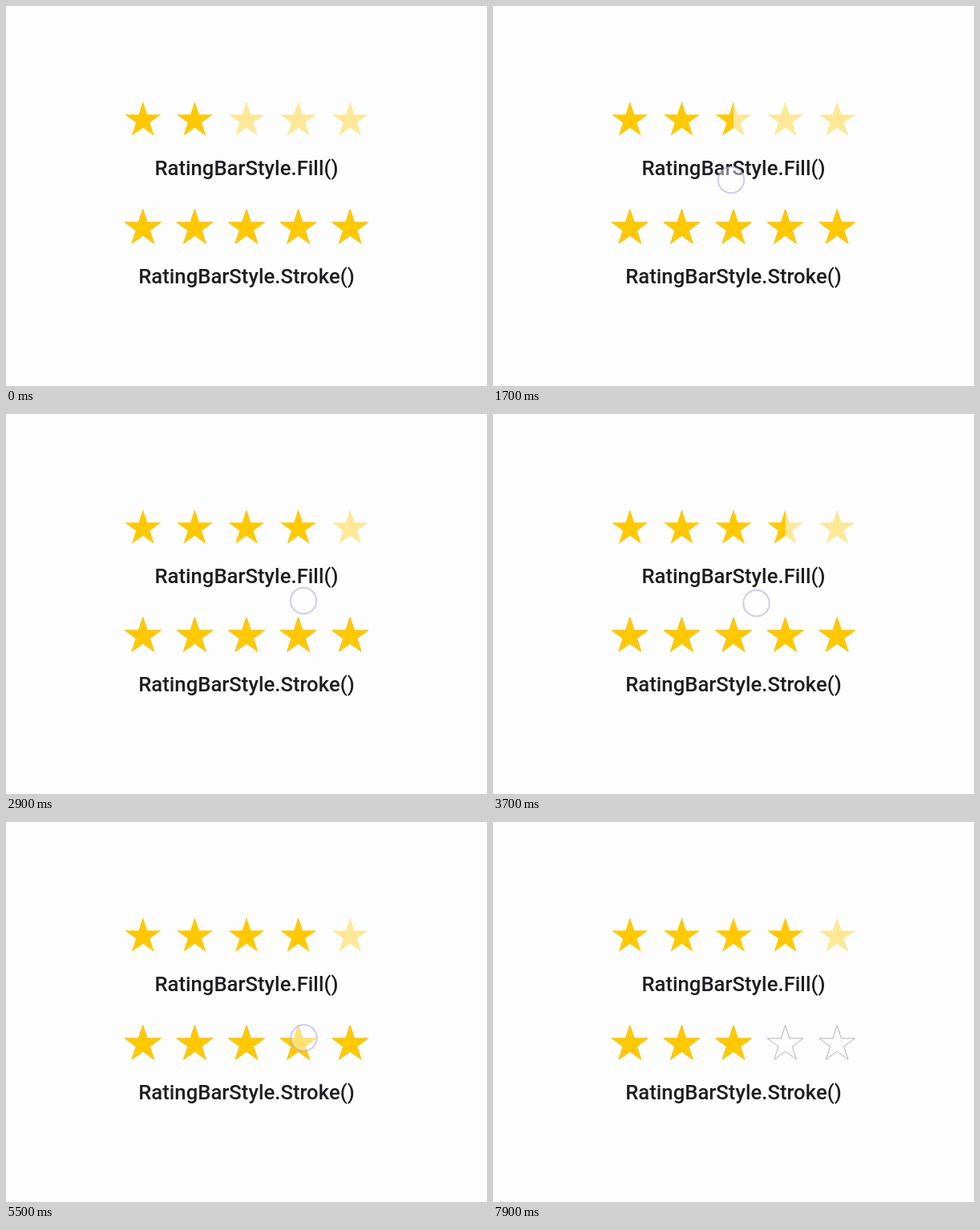
An HTML page that plays this animation: 600 by 474 pixels, repeating every 8 s.

```html
<!DOCTYPE html>
<html lang="en">
<head>
<meta charset="utf-8">
<title>Rating bar styles</title>
<style>
  html, body { margin: 0; width: 100%; height: 100%; overflow: hidden; background: #fdfdfd; }
  svg { display: block; width: 100vw; height: 100vh; }
  text { font: 500 25.7px Roboto, sans-serif; fill: #1e1e21; text-anchor: middle; }
</style>
</head>
<body>
<svg id="stage" viewBox="0 0 600 474">
  <text x="300" y="211">RatingBarStyle.Fill()</text>
  <text x="300" y="346">RatingBarStyle.Stroke()</text>
</svg>
<script>
const LOOP = 8000, STEP = 100;
const GOLD = '#ffc800';
const RADIUS = 23.5, SPACING = 64.6, BOX = 50;
const stage = document.getElementById('stage');

function add(parent, tag, attrs) {
  const node = document.createElementNS('http://www.w3.org/2000/svg', tag);
  for (const key in attrs) node.setAttribute(key, attrs[key]);
  return parent.appendChild(node);
}

// Regular five-pointed star around the origin, with straight arms.
const inner = RADIUS * (3 - Math.sqrt(5)) / 2;
const star = Array.from({ length: 10 }, (_, i) => {
  const r = i % 2 ? inner : RADIUS, angle = i * Math.PI / 5;
  return [r * Math.sin(angle), -r * Math.cos(angle)];
}).join(' ');

// Each star is an empty shape below a gold one, clipped to the rated part.
function ratingBar(id, cy, emptyStyle, goldStyle) {
  const clips = [];
  for (let i = 0; i < 5; i++) {
    const cx = 300 + SPACING * (i - 2);
    const group = add(stage, 'g', { transform: `translate(${cx} ${cy})` });
    const clip = add(group, 'clipPath', { id: id + i });
    clips.push(add(clip, 'rect', { x: -BOX / 2, y: -BOX / 2, width: BOX, height: BOX }));
    add(group, 'polygon', { points: star, ...emptyStyle });
    add(group, 'polygon', { points: star, fill: GOLD, ...goldStyle, 'clip-path': `url(#${id}${i})` });
  }
  return rating => clips.forEach((rect, i) =>
    rect.setAttribute('width', BOX * clamp(rating - i)));
}

const clamp = value => Math.min(1, Math.max(0, value));
const smooth = k => k * k * (3 - 2 * k);

const setFill = ratingBar('fill', 142.8, { fill: GOLD, 'fill-opacity': 0.4 });
const setStroke = ratingBar('stroke', 277.2,
  { fill: 'none', stroke: '#a0a0a0', 'stroke-width': 0.8 },
  { stroke: GOLD, 'stroke-width': 1 });

const pointer = add(stage, 'circle', {
  r: 16.2, fill: '#fff', 'fill-opacity': 0.45,
  stroke: '#aaa4d8', 'stroke-opacity': 0.55, 'stroke-width': 2
});

// Turning points of the drag: [time, x, y]
const drag = [
  [700, 252, 208], [1700, 297, 217], [2900, 371, 233], [3700, 328.5, 236],
  [4800, 319, 252], [5800, 386, 274], [6400, 386, 274], [6500, 358.5, 284], [6900, 318, 287]
];
const FILL_END = 5800, STROKE_START = 6200;

function pointerAt(t) {
  const next = drag.findIndex(point => point[0] > t);
  if (next <= 0) return drag.at(next).slice(1);
  const [t0, x0, y0] = drag[next - 1], [t1, x1, y1] = drag[next];
  const k = smooth((t - t0) / (t1 - t0));
  return [x0 + (x1 - x0) * k, y0 + (y1 - y0) * k];
}

// The pointer's place along the bar, rounded up to half a star.
const ratingAt = t => Math.ceil((pointerAt(t)[0] - 146.5) / 30.2) / 2;

function render(time) {
  const t = Math.floor((time % LOOP) / STEP) * STEP;
  const [x, y] = pointerAt(t);
  setFill(ratingAt(Math.min(t, FILL_END)));
  setStroke(t < STROKE_START ? 5 : ratingAt(t));
  pointer.setAttribute('cx', x);
  pointer.setAttribute('cy', y);
  pointer.setAttribute('opacity', clamp((t - 600) / 300) * clamp((7800 - t) / 300));
}

const start = performance.now();
function tick() {
  render(performance.now() - start);
  requestAnimationFrame(tick);
}
tick();
</script>
</body>
</html>
```
